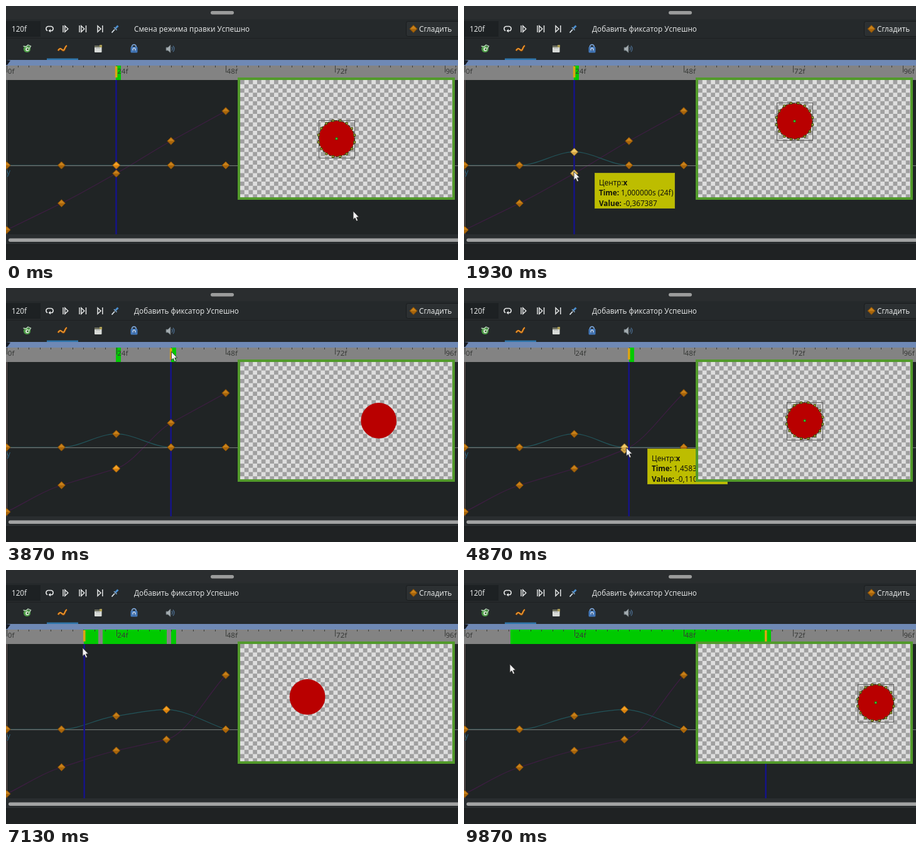
Animation of 720x405 px, one loop 9990 ms. Source, as an HTML page with a canvas:

```html
<!DOCTYPE html>
<html lang="ru">
<head>
<meta charset="utf-8">
<title>Curve editor</title>
<style>
html, body { margin: 0; width: 100%; height: 100%; overflow: hidden; background: #1d2021; }
canvas { display: block; width: 720px; height: 405px; }
</style>
</head>
<body>
<canvas id="stage" width="720" height="405"></canvas>
<script>
const LOOP = 9990, AXIS = 254, STEP = 7.267;
const FONT = '"Noto Sans", "Open Sans", sans-serif';
const g = document.getElementById('stage').getContext('2d');
const frameX = n => 1.2 + n * STEP;

// Key tables: [time, value, ...]; values ease between neighbours
const CURSOR = [
  [0, 553, 327], [270, 553, 327], [980, 175, 251], [1250, 175, 251], [1650, 175, 230],
  [1720, 175, 230], [1900, 175, 264], [2250, 175, 264], [2950, 175, 285], [3200, 175, 285],
  [3750, 263.4, 101.5], [4000, 263.4, 101.5], [4280, 264, 212], [4400, 264, 212], [5080, 257, 267],
  [5250, 257, 267], [5520, 257.4, 250], [5625, 257.4, 250], [6130, 257.4, 219], [6200, 257.4, 219],
  [6550, 263, 102], [6620, 263, 102], [7130, 122, 124], [7400, 73, 150]
];
const Y24 = [[1250, AXIS], [1650, 232.7]];
const X24 = [[2250, 267], [2950, 288]];
const X36 = [[4400, 215.3], [5080, 270.3]];
const SHIFT = [[4400, 36], [5080, 35]];
const Y36 = [[5625, AXIS], [6130, 222.7]];
// Tooltips: [from, to, channel, waypoint index]
const TIPS = [[1050, 1700, 'y', 2], [1860, 3020, 'x', 2], [4290, 5170, 'x', 3], [5420, 6170, 'y', 3]];

function track(keys, t, i = 1) {
  if (t <= keys[0][0]) return keys[0][i];
  for (let k = 1; k < keys.length; k++) {
    const a = keys[k - 1], b = keys[k];
    if (t < b[0]) {
      const u = (t - a[0]) / (b[0] - a[0]);
      return a[i] + (b[i] - a[i]) * u * u * (3 - 2 * u);
    }
  }
  return keys[keys.length - 1][i];
}

// Clamped tangents: flat at extrema, otherwise the gentler neighbour slope
function slopes(p) {
  const d = p.slice(1).map((q, i) => (q[1] - p[i][1]) / (q[0] - p[i][0]));
  return p.map((_, i) => {
    if (i === 0) return d[0];
    if (i === p.length - 1) return d[i - 1];
    const a = d[i - 1], b = d[i];
    return a * b <= 0 ? 0 : Math.sign(a) * Math.min(Math.abs(a), Math.abs(b));
  });
}

function valueAt(p, x) {
  const m = slopes(p), last = p.length - 1;
  if (x >= p[last][0]) return p[last][1];
  let i = 0;
  while (x > p[i + 1][0]) i++;
  const w = p[i + 1][0] - p[i][0], u = (x - p[i][0]) / w, s = u * u * (3 - 2 * u);
  return p[i][1] * (1 - s) + p[i + 1][1] * s +
    w * (m[i] * u * (1 - u) ** 2 - m[i + 1] * u * u * (1 - u));
}

function drawCurve(p, color) {
  const m = slopes(p);
  g.beginPath();
  g.moveTo(...p[0]);
  for (let i = 1; i < p.length; i++) {
    const [x0, y0] = p[i - 1], [x1, y1] = p[i], h = (x1 - x0) / 3;
    g.bezierCurveTo(x0 + h, y0 + m[i - 1] * h, x1 - h, y1 - m[i] * h, x1, y1);
  }
  stroke(color, 1.2);
}

function box(x, y, w, h, color) { g.fillStyle = color; g.fillRect(x, y, w, h); }
function pill(x, y, w, h, r, color) {
  g.beginPath(); g.roundRect(x, y, w, h, r); g.fillStyle = color; g.fill();
}
function stroke(color, width = 1) { g.strokeStyle = color; g.lineWidth = width; g.stroke(); }
function poly(points, fill, line, width) {
  g.beginPath();
  points.forEach(p => g.lineTo(...p));
  g.closePath();
  if (fill) { g.fillStyle = fill; g.fill(); }
  if (line) stroke(line, width);
}
function path(d, color, width, fill) {
  const p = new Path2D(d);
  if (fill) { g.fillStyle = fill; g.fill(p); }
  if (color) { g.strokeStyle = color; g.lineWidth = width; g.stroke(p); }
}
function disc(x, y, r, color) {
  g.beginPath(); g.arc(x, y, r, 0, 7); g.fillStyle = color; g.fill();
}
function text(s, x, y, color, size = 11.7, weight = '') {
  g.font = `${weight} ${size}px ${FONT}`;
  g.fillStyle = color;
  g.fillText(s, x, y);
  return x + g.measureText(s).width;
}

function diamond(x, y, look = 0) {
  const [top, low, edge] = [
    ['#c9811a', '#a8650b', '#7a4a0a'],
    ['#f5a226', '#d98210', '#95600d'],
    ['#efcb68', '#d6a645', '#9a7830']
  ][look];
  const r = 6;
  poly([[x, y - r], [x + r, y], [x, y + r], [x - r, y]], low, edge, 1);
  poly([[x, y - r + 1], [x + r - 1, y], [x - r + 1, y]], top);
}

function toolbar(t) {
  box(0, 0, 720, 95, '#25292b');
  box(0, 0, 720, 21, '#2a2d2f');
  pill(326, 8, 37, 5.5, 2.7, '#9b9c9c');
  box(0, 24, 55, 25, '#1d2123');
  box(0, 51, 720, 1, '#1e2123');
  box(0, 24, 1, 62, '#191c1d');
  text('120f', 9, 41, '#e4e6e6');

  const c = '#e2e4e4';
  path('M66 39.5 A3.7 3.7 0 0 1 67 32.5 H72 A3.7 3.7 0 0 1 73 39.5 H69', c, 1.6);
  path('M71 36.8 L67.5 39.5 L71 42.2 Z', null, 0, c);
  path('M91 31 V42 M93.8 31.8 V41.2 L98.8 36.5 Z', c, 1.5);
  path('M117 31 V42 M119.8 31.8 V41.2 L124.8 36.5 Z M127.5 31 V42', c, 1.5);
  path('M146 31.8 V41.2 L151 36.5 Z M153.8 31 V42', c, 1.5);
  path('M168.5 42.5 L173 37.5', '#dce5ec', 1.8);
  path('M172 34 L176.5 38.5', '#86aacb', 1.6);
  path('M174.5 35.5 L178.5 31.5', '#4b8fd0', 3);

  const msg = t < 1250 ? 'Смена режима правки Успешно' : 'Добавить фиксатор Успешно';
  text(msg, 204, 41, '#dfe1e1');
  pill(637.5, 24.5, 90, 24, 3, '#2c3032');
  stroke('#191c1d');
  diamond(649, 36.5);
  text('Сгладить', 658, 41, '#e4e6e6');

  disc(33.5, 68.5, 5.6, '#4c9d46');
  path('M27.5 64 L32 65 L35 62 L39.5 64 L37 68', '#bcd9bd', 1.3);
  disc(34, 69, 2.9, '#e3ebe1');
  disc(34.5, 69, 1.4, '#2d6224');
  path('M83 71.5 C86 66 88 69 90 70.5 C94 73 93 65 97 63.5', '#7a420d', 3.4);
  path('M83 71 C86 65.5 88 68.5 90 70 C94 72.5 93 64.5 97 63', '#f29b32', 1.8);
  box(65, 83.5, 50, 2.5, '#2f75ab');
  pill(141, 64, 11.5, 10, 1, '#d8dbd8');
  box(141, 63, 8, 3, '#6f7160');
  box(149, 62, 4, 4, '#a89a54');
  box(143, 67, 7, 1, '#b2b5b2');
  path('M200.5 67 V65 A3.4 3.4 0 0 1 207.3 65 V67', '#7ba4d6', 1.8);
  pill(198.5, 65, 11, 9.5, 1.5, '#4377b8');
  disc(204, 69, 2.5, '#d3e0ef');
  box(203, 68, 2, 4.5, '#31598f');
  path('M255 66 H258 L262 62 V74.5 L258 71 H255 Z', '#5e686e', .8, '#a3abaf');
  path('M264 65.5 Q266.5 68.3 264 71 M266 63.5 Q270 68.3 266 73', '#49698a', 1.3);
}

function playhead(t) {
  if (t < 3800) return 24;
  if (t < 6620) return 36;
  if (t < 7450) return Math.max(10, Math.min(36, Math.round((track(CURSOR, t) + 0.8) / STEP)));
  return Math.min(66, Math.floor(10 + (t - 7450) * 0.0415));
}

function cached(n, t, now) {
  if (n === now) return true;
  if (t < 3800) return false;
  if (t < 4400) return n === 24;
  if (n === 36) return true;
  if (t < 6620) return false;
  const scrubbed = n >= now && n <= 34 && n !== 20;
  if (t < 7450) return scrubbed;
  return n >= 10 && (n <= now || scrubbed);
}

function ruler(t, now) {
  box(0, 86, 720, 9, '#6f89b5');
  poly([[0, 86], [7, 87], [2, 94], [0, 94]], '#171c25');
  box(0, 95, 720, 23, '#838383');
  for (let n = 0; n < 99; n++) {
    if (cached(n, t, now)) box(Math.round(frameX(n) - .3), 95, 8, 23, '#00ca00');
  }
  for (let k = 0; k < 42; k++) {
    box(Math.round(frameX(k * 2.4)), 95, 1, k % 10 ? 3 : 11, '#3b3d3b');
  }
  for (let n = 0; n <= 96; n += 24) text(n + 'f', frameX(n) + 1.6, 107.5, '#373937', 11.6);
  box(frameX(now) - 1.8, 96, 3.6, 18, '#dca414');
}

function tooltip(channel, px, py, n, y) {
  const x = Math.round(px + 33), top = Math.round(py + 1.5);
  box(x, top, 128, 57, '#bdbd00');
  g.strokeStyle = '#a5a512';
  g.lineWidth = 1;
  g.strokeRect(x + .5, top + .5, 127, 56);
  const ink = '#14150a', num = v => v.toFixed(6).replace('.', ',');
  const row = (a, b, dy, bold) => {
    const end = text(a, x + 7, top + dy, ink, 11.7, bold ? 'bold' : '');
    text(b, end, top + dy, ink, 11.7, bold ? '' : 'bold');
  };
  row('Центр:', channel, 19.5, false);
  row('Time:', ` ${num(n / 24)}s (${n}f)`, 36, true);
  row('Value:', ' ' + num((AXIS - y) * 0.0282605), 52.5, true);
}

const checker = (() => {
  const c = document.createElement('canvas'), k = c.getContext('2d'), s = 6.75;
  c.width = 338; c.height = 187;
  k.fillStyle = '#dedede';
  k.fillRect(0, 0, 338, 187);
  k.fillStyle = '#a0a0a0';
  for (let j = 0; j < 28; j++) {
    for (let i = j % 2; i < 51; i += 2) k.fillRect(i * s, j * s, s, s);
  }
  return c;
})();

function preview(x, y, handles) {
  box(369, 114, 346, 195, '#529a2b');
  g.drawImage(checker, 373, 118);
  disc(x, y, 28.4, '#b90000');
  if (!handles) return;
  g.strokeStyle = '#626262';
  g.lineWidth = 1;
  g.strokeRect(Math.round(x - 29) + .5, Math.round(y - 30) + .5, 57, 60);
  g.beginPath();
  g.arc(x, y, 28.8, 0, 7);
  g.setLineDash([4, 2]);
  stroke('#35340f', 1.3);
  g.setLineDash([]);
  for (let k = 0; k < 16; k++) {
    const a = (k + .5) * Math.PI / 8;
    const hx = x + 29.2 * Math.cos(a), hy = y + 29.2 * Math.sin(a);
    box(hx - 2, hy - 2, 4, 4, '#3f4010');
    box(hx - 1.1, hy - 1.1, 2.2, 2.2, '#a5ad35');
  }
  box(x - 2, y - 2, 4, 4, '#245f12');
  box(x - 1.2, y - 1.2, 2.4, 2.4, '#3ddc32');
}

function pointer(x, y) {
  const shape = [[0, 0], [0, 13.5], [3, 10.8], [5.2, 16], [7.6, 15], [5.4, 9.9], [9.3, 9.7]];
  poly(shape.map(([a, b]) => [x + a, y + b]), '#f2f2f2', '#2b2b2b', .9);
}

function draw(t) {
  const now = playhead(t), at = frameX(now);
  const frames = [0, 12, 24, Math.round(track(SHIFT, t)), 48];
  const zip = ys => ys.map((y, i) => [frameX(frames[i]), y]);
  const xs = zip([357, 314.5, track(X24, t), track(X36, t), 167.5]);
  const ys = zip([AXIS, AXIS, track(Y24, t), track(Y36, t), AXIS]);
  const px = track(CURSOR, t), py = track(CURSOR, t, 2);
  const tip = TIPS.find(p => t >= p[0] && t < p[1]);

  toolbar(t);
  ruler(t, now);

  box(0, 118, 720, 246, '#202425');
  box(1, 118, 1, 246, t < 1250 ? '#5b5e5d' : '#786461');
  drawCurve(xs, '#3d1d42');
  drawCurve(ys, '#22545a');
  box(0, AXIS, 720, 1.2, '#6f7572');
  text('y', 1, 268.5, '#29617c', 11.7);
  box(at - 1.3, 118, 2.4, 246, '#15138c');

  const hot = tip ? tip[3] : -1;
  const [row, index] = t < 2250 ? [ys, 2] : t < 4400 ? [xs, 2] : t < 5625 ? [xs, 3] : [ys, 3];
  for (const points of [xs, ys]) {
    points.forEach(([x, y], i) => {
      diamond(x, y, i === hot ? 2 : points === row && i === index ? 1 : 0);
    });
  }

  if (tip) tooltip(tip[2], px, py, frames[hot], (tip[2] === 'x' ? xs : ys)[hot][1]);

  const cx = 526.5 + (267 - valueAt(xs, at)) * 1.3;
  const cy = 211.5 - (AXIS - valueAt(ys, at)) * 1.31;
  const busy = (t >= 3800 && t < 4000) || (t >= 6620 && t < 9000);
  preview(cx, cy, !busy);

  box(0, 364, 720, 17, '#292d2f');
  pill(4, 370.5, 730, 5.5, 2.7, '#a2a3a3');
  box(0, 380, 720, 1, '#181b1c');
  box(0, 381, 720, 24, '#1f2223');
  pointer(px, py);
}

const start = performance.now();
function tick() {
  draw((performance.now() - start) % LOOP);
  requestAnimationFrame(tick);
}
tick();
</script>
</body>
</html>
```
